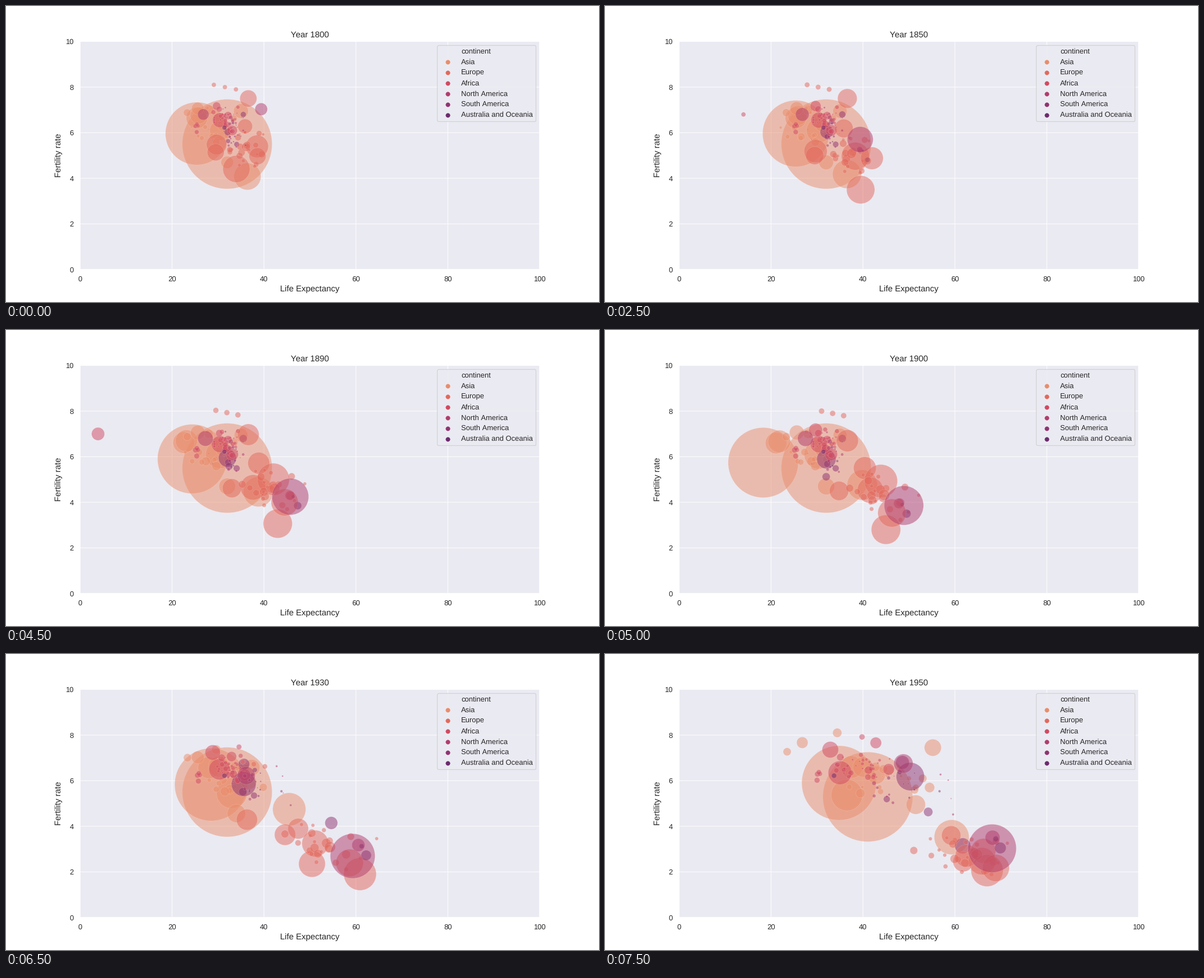
These frames come from a looping animation (1058 by 529 pixels, 8000 ms). A matplotlib script:

```python
import numpy as np
import matplotlib.pyplot as plt
from matplotlib.animation import FuncAnimation
from matplotlib.lines import Line2D

DPI = 88.1667
INK = "0.15"
DECADES = 16

plt.rcParams.update({
    "font.family": "Liberation Sans", "text.color": INK,
    "text.hinting": "none", "text.hinting_factor": 1,
    "axes.labelcolor": INK, "axes.labelsize": 12, "axes.titlesize": 12,
    "xtick.labelsize": 11, "ytick.labelsize": 11, "legend.fontsize": 11,
    "xtick.color": INK, "ytick.color": INK,
    "axes.facecolor": "#EAEAF2", "axes.edgecolor": "white",
    "axes.linewidth": 1.25, "axes.axisbelow": True,
    "grid.color": "white", "grid.linewidth": 0.8,
})

AS, EU, AF, NA, SA, OC = range(6)
NAMES = ["Asia", "Europe", "Africa", "North America", "South America",
         "Australia and Oceania"]
COLORS = ["#e98d6b", "#e3685c", "#d14a61", "#b13c6c", "#8f3371", "#6c2b6d"]

rng = np.random.default_rng(18)
steps = np.arange(DECADES)
bubbles = []


def spread():
    return np.clip(rng.normal(), -1.8, 1.8)


def track(group, sizes, *keys, lead=0, dx=0, dy=0):
    """Sizes: radius in px in 1800, 1900, 1950; keys: (decade, life, births)."""
    d, x, y = zip(*keys)
    t = steps + lead
    bubbles.append((group, np.interp(t, d, x) + dx, np.interp(t, d, y) + dy,
                    np.interp(steps, (0, 10, 15), sizes)))


def crowd(group, n, small, big, sx, sy, lag, *path):
    """Small countries that follow one path, some early and some late."""
    for _ in range(n):
        r = small + (big - small) * rng.random() ** 2
        track(group, (.8 * r, r, r), *path, lead=lag * spread(),
              dx=sx * spread(), dy=sy * spread())


# Asia
track(AS, (80, 80, 80), (13, 32, 5.5), (14, 34.4, 5.25), (15, 41.05, 5.29))
track(AS, (56, 62.5, 66.5), (8, 25.4, 5.96), (9, 24.4, 5.9), (10, 18.3, 5.74),
      (11, 22.9, 5.74), (12, 24.7, 5.74), (14, 32.3, 5.92), (15, 34.8, 5.9))
track(AS, (24, 27, 31), (0, 36.4, 4.08), (3, 36.4, 4.5), (7, 36.6, 3.87),
      (12, 42, 5.35), (14, 49, 4.14), (15, 59.3, 3.52))
track(AS, (18, 26, 28), (10, 30.4, 6.1), (12, 30, 5.5), (14, 36, 5.4),
      (15, 36.5, 5.37))
track(AS, (19, 19, 20), (7, 25.4, 6.65), (10, 21.1, 6.6), (12, 23.7, 6.7),
      (14, 32.4, 6.45), (15, 37.5, 6.6))
track(AS, (15, 20, 18), (7, 25.8, 6.75), (10, 21.8, 6.67), (14, 33, 6.6),
      (15, 40, 6.6))
track(AS, (11, 15, 17), (10, 32, 4.7), (12, 32, 4.13), (14, 36, 5),
      (15, 51.5, 4.95))
track(AS, (13, 12, 16), (12, 35, 6.95), (14, 39.7, 6.2), (15, 42.9, 6.25))
track(AS, (9, 12, 15), (12, 31, 6.3), (14, 42.4, 5.6), (15, 55.2, 7.45))
track(AS, (11, 13, 10), (12, 25.6, 7.06), (14, 25.6, 6.98), (15, 26.8, 7.67))
track(AS, (6.5, 7, 7), (12, 23.3, 6.88), (15, 23.5, 7.27))
track(AS, (9, 8, 8), (12, 28, 7), (14, 31.2, 7.73), (15, 34.4, 8.1))
for k in range(4):
    track(AS, (2 + k, 3 + 1.7 * k, 4 + 1.6 * k), (3, 24.2, 6.25),
          (7, 20, 6.2), (10, 24.3, 6.2), (12, 15.2, 6.25), (14, 41, 5.8),
          (15, 50, 6.1), dx=1.5 * k, dy=-.4 * (k % 2))
crowd(AS, 20, 1.5, 9, 2.4, .45, .7, (12, 30.8, 6.4), (14, 37, 6.2),
      (15, 43, 6.3), (17, 54, 6))

# South America
track(SA, (6, 17, 25), (7, 32.1, 6.03), (12, 32, 5.8), (14, 39.2, 5.9),
      (15, 50.3, 6.18))
track(SA, (4, 6, 8), (0, 32.2, 5.63), (7, 32.2, 5.9), (12, 32.2, 5.53),
      (14, 38.6, 5.5), (15, 54.2, 4.63))
track(SA, (3, 7, 14), (7, 33.2, 6.5), (10, 32, 5.12), (12, 50.2, 4.86),
      (14, 59.1, 3.43), (15, 61.7, 3.14))
track(SA, (5, 7, 12), (10, 35.5, 6.8), (14, 35.7, 6.7), (15, 48.6, 6.8))
crowd(SA, 5, 2, 6, 1.2, .45, .8, (11, 33, 6.3), (14, 41, 6), (16, 56, 6))

# Africa
track(AF, (13, 15, 21), (12, 30.4, 6.55), (14, 30.2, 6.45), (15, 35, 6.35))
track(AF, (7, 12, 14.5), (8, 29.7, 7.17), (9, 3.9, 7), (10, 29.7, 7.17),
      (12, 29.7, 7.17), (14, 28, 7.3), (15, 32.9, 7.36))
track(AF, (4, 4, 5), (1, 29, 6.9), (2, 6.4, 6.9), (3, 29, 6.9), (4, 29, 6.9),
      (5, 14, 6.8), (6, 16.3, 6.8), (7, 29, 6.9), (14, 35.5, 7.58),
      (15, 39.8, 7.92))
track(AF, (7, 7, 10), (12, 32.2, 6.75), (14, 33.7, 7.37), (15, 42.8, 7.66))
track(AF, (9, 11, 10), (12, 33.1, 6.1), (14, 38.5, 6.4), (15, 45.6, 6.5))
crowd(AF, 4, 4, 7, .5, .4, .1, (12, 25.5, 6.3), (14, 26.3, 6.2),
      (15, 30.5, 6.3))
crowd(AF, 36, 1.5, 7, 1.5, .3, .5, (12, 31.9, 6.6), (14, 34, 6.5),
      (15, 39.5, 6.7), (16, 44, 6.7))

# Europe
for k in range(3):
    track(EU, (4, 5, 4), (3, 29.1, 8.1), (7, 26.6, 8.1), (10, 31, 8),
          (12, 28, 7.85), (14, 42.8, 5.8), (15, 60, 3.4),
          dx=2.4 * k, dy=-.1 * k)
track(EU, (15, 19.5, 18), (7, 36.6, 7.5), (10, 36.6, 6.7), (12, 28, 5.37),
      (14, 44.6, 3.21), (15, 61.8, 2.45))
track(EU, (13, 20, 17), (0, 35.9, 6.28), (7, 35.8, 6.15), (10, 40.4, 5.5),
      (12, 46.5, 4.7), (14, 48.4, 3.09), (15, 59.2, 3.6))
track(EU, (18, 23, 24), (3, 29.7, 5.48), (7, 29.7, 4.9), (10, 41.6, 4.53),
      (12, 45.5, 3.43), (14, 56.8, 3.06), (15, 65.9, 2.47))
track(EU, (15, 17, 20), (3, 29.5, 5.14), (7, 29.5, 4.85), (10, 34.8, 4.5),
      (12, 39.3, 4.14), (14, 49.9, 3.12), (15, 62.5, 2.7))
track(EU, (24, 26, 22), (0, 34, 4.41), (1, 35.8, 3.9), (3, 39.6, 3.73),
      (5, 39.5, 3.5), (7, 36.4, 3.43), (8, 41, 3.33), (10, 45, 2.8),
      (12, 51.5, 2.7), (14, 49.4, 2), (15, 66.2, 2.92))
track(EU, (20, 29.5, 28.5), (0, 38.5, 5.4), (3, 38.4, 4.77), (7, 38.3, 5.17),
      (10, 43.9, 4.93), (12, 53.5, 2.4), (13, 60.9, 1.9), (14, 60.6, 2.37),
      (15, 67, 2.06))
crowd(EU, 24, 3, 11, 1.9, .4, .9, (0, 36, 5.3), (7, 38, 4.9), (10, 43.5, 4.4),
      (12, 50, 3.4), (14, 56.5, 2.8), (15, 64, 2.7), (17, 69, 2.5))

# North America and Oceania
track(NA, (10, 14, 17), (7, 26.8, 6.8), (10, 27.5, 6.8), (12, 33.8, 6.1),
      (14, 38.5, 6.35), (15, 48.8, 6.75))
for group, sizes, dx, dy in ((NA, (1.5, 9, 13), -.7, .2),
                             (OC, (1.5, 7.5, 10), 1, -.25),
                             (OC, (1, 3.5, 5), 0, .15)):
    track(group, sizes, (0, 35, 5.7), (7, 42, 4.8), (10, 48.5, 3.75),
          (12, 57.5, 3.35), (14, 65, 2.6), (15, 68.9, 3.3), dx=dx, dy=dy)
track(OC, (4, 4, 4.5), (14, 31.4, 6.22), (15, 33.7, 6.22))
crowd(OC, 4, .8, 1.6, 2.5, .5, .5, (12, 32, 6), (14, 44, 6), (16, 56, 6))
crowd(NA, 14, 1, 4.5, 1.6, .5, .9, (11, 32.6, 6.2), (14, 42, 5.7),
      (15, 52, 5.9), (17, 62, 5))

# the two last rows lie over the rest
track(EU, (15, 25, 24), (0, 38.6, 4.97), (3, 43, 4.83), (7, 40.9, 4.93),
      (10, 46.3, 3.53), (12, 56.4, 3.05), (14, 60.9, 1.74), (15, 68.9, 2.17))
track(NA, (11, 35, 43), (0, 39.4, 7.03), (3, 39.4, 6.38), (7, 39.4, 5.02),
      (10, 48.9, 3.86), (12, 55.4, 3.27), (14, 63.2, 2.12), (15, 68.1, 3.03))

groups, life, births, radius = zip(*bubbles)
life, births, radius = map(np.array, (life, births, radius))
area = (2 * radius * 72 / DPI) ** 2

fig = plt.figure(figsize=(12, 6), dpi=DPI, facecolor="white")
ax = fig.add_axes([.125, .11, .775, .77])
ax.set(xlim=(0, 100), ylim=(0, 10), xlabel="Life Expectancy",
       ylabel="Fertility rate")
ax.grid(True, snap=False)
ax.tick_params(length=6, width=1.25, bottom=False, left=False)
title = ax.set_title("Year 1800")

dots = ax.scatter(life[:, 0], births[:, 0], s=area[:, 0], alpha=.5,
                  c=[COLORS[g] for g in groups], edgecolors="white",
                  linewidths=.2)

handles = [Line2D([], [], lw=0, label="continent")]
handles += [ax.scatter([], [], s=36, color=c, linewidths=.5, label=n)
            for c, n in zip(COLORS, NAMES)]
ax.legend(handles=handles, loc="upper right")


def draw(i):
    dots.set_offsets(np.column_stack([life[:, i], births[:, i]]))
    dots.set_sizes(area[:, i])
    title.set_text(f"Year {1800 + 10 * i}")
    return dots, title


anim = FuncAnimation(fig, draw, frames=DECADES, interval=500, repeat=True,
                     repeat_delay=0, blit=False)
plt.show()
```
